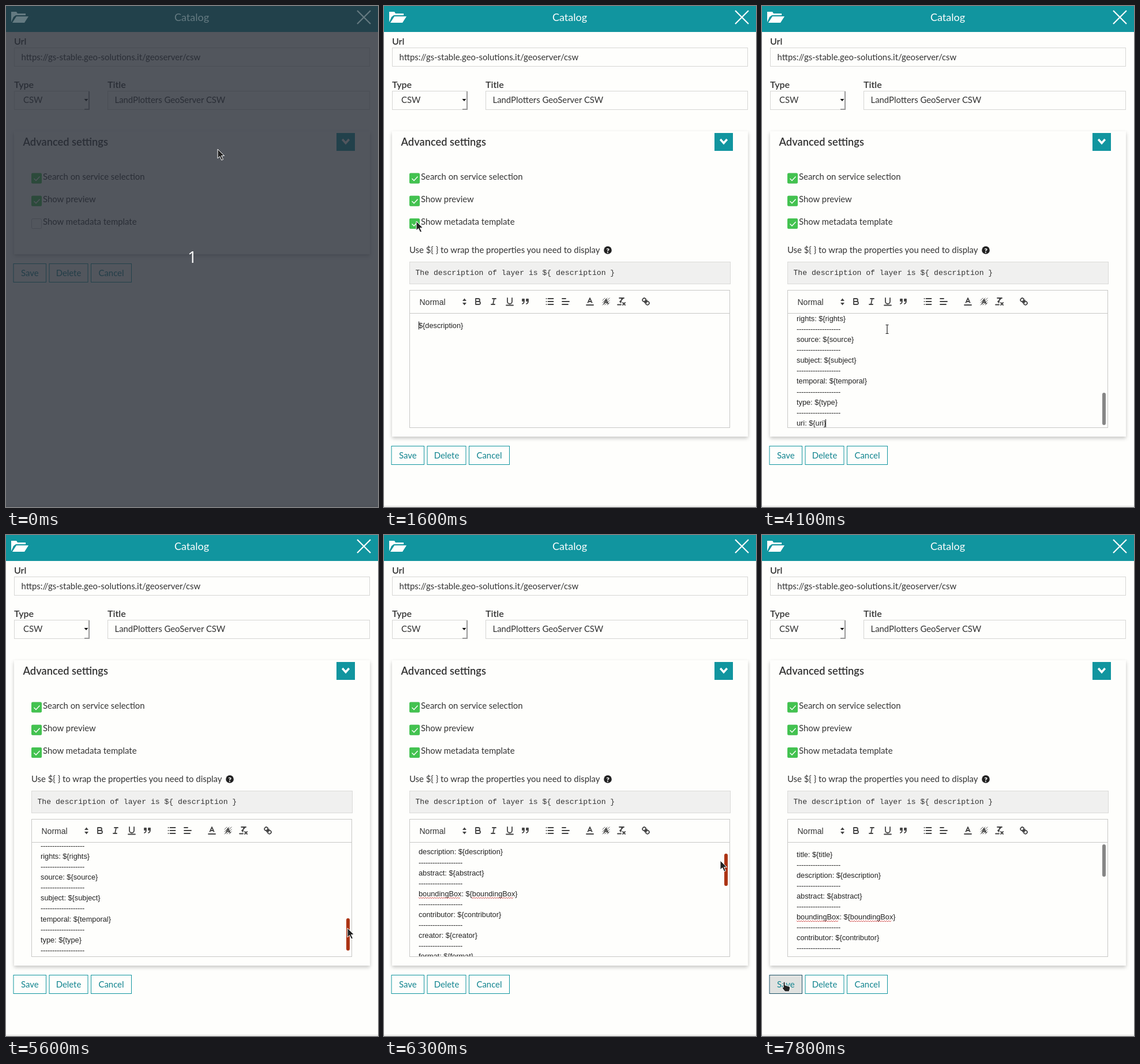
Recreate the animation shown at these times as an HTML page. Size 645x868 px, loop 8 s.

```html
<!DOCTYPE html>
<html lang="en">
<head>
<meta charset="utf-8">
<title>Catalog settings</title>
<style>
  html, body { margin: 0; width: 100%; height: 100%; overflow: hidden; background: #fefefc; }
  svg { display: block; }
  text { font: 14.9px Lato, sans-serif; fill: #333; white-space: pre; }
  .label { font-weight: 600; font-size: 16px; }
  .heading { font-weight: 600; font-size: 18.3px; }
  .field { fill: #fefefc; stroke: #d6d6d4; }
  .box { fill: none; stroke: #c8c8c6; }
  .teal { fill: #11959f; }
  .code { font: 13.1px "Liberation Mono", monospace; }
  .picker { font: 14px "Liberation Sans", sans-serif; }
  #editor text { font: 12.75px "Liberation Sans", sans-serif; fill: #222; }
  #editor .rule { letter-spacing: -.25px; }
  #buttons rect { fill: #fefefc; stroke: #11959f; }
  #buttons text { fill: #11848f; text-anchor: middle; }
  #buttons .pressed { fill: #e0e2e0; stroke: #1c5266; }
  .icons { fill: none; stroke: #444; stroke-width: 2; stroke-linecap: round; stroke-linejoin: round; }
  .pointer { fill: #222; stroke: #fff; stroke-linejoin: round; }
</style>
</head>
<body>
<svg width="645" height="868" viewBox="0 0 645 868">
  <rect width="645" height="868" fill="#fefefc"/>
  <rect y="866" width="645" height="1" fill="#dcdcda"/>
  <rect class="teal" width="645" height="45"/>

  <text class="label" x="14" y="66.5">Url</text>
  <rect class="field" x="14.5" y="72.5" width="616" height="32"/>
  <text x="26.5" y="93.5">https://gs-stable.geo-solutions.it/geoserver/csw</text>
  <text class="label" x="14" y="141.5">Type</text>
  <rect class="field" x="14.5" y="147.5" width="130" height="32"/>
  <path d="M144 148v31h-8" fill="none" stroke="#999" stroke-width="2"/>
  <path d="M135.5 161h7l-3.5 4z" fill="#111"/>
  <text x="30" y="168">CSW</text>
  <text class="label" x="176" y="141.5">Title</text>
  <rect class="field" x="176.5" y="147.5" width="454" height="32"/>
  <text x="188.5" y="168">LandPlotters GeoServer CSW</text>

  <rect id="panel" x="14" y="217" width="617" height="213" fill="#fefefc"
    style="filter:drop-shadow(0 3px 3px rgba(0,0,0,.22))"/>
  <text class="heading" x="29.5" y="241.5">Advanced settings</text>
  <rect class="teal" x="573" y="220" width="32" height="31"/>
  <path d="M583.2 231l5.8 6.5 5.8-6.5" fill="none" stroke="#fff" stroke-width="3.5"/>
  <g id="checks"></g>

  <g id="template">
    <text x="44" y="428">Use \${ } to wrap the properties you need to display</text>
    <circle cx="388" cy="423" r="6.8" fill="#222"/>
    <text x="388" y="427.5" text-anchor="middle" style="font-size:12px;font-weight:900;fill:#fff">?</text>
    <rect x="44.5" y="443.5" width="556" height="38" fill="#f0f0ef" stroke="#dadad8"/>
    <text class="code" x="54.5" y="466">The description of layer is ${ description }</text>
    <rect class="box" x="44.5" y="492.5" width="555" height="40"/>
    <rect class="box" x="44.5" y="532.5" width="555" height="198"/>
    <text class="picker" x="61.5" y="517.5">Normal</text>
    <path d="M136 511l3.5-4.5 3.5 4.5zM136 514l3.5 4.5 3.5-4.5z" fill="#444"/>
    <g class="icons" id="tools"></g>
    <svg id="editor" x="45" y="533" width="554" height="197" viewBox="45 533 554 197">
      <g id="draft">
        <rect id="selection" x="60" y="546" width="77" height="16" fill="#a9cdf3"/>
        <text x="60" y="557.5">${description}</text>
      </g>
      <g id="lines"></g>
      <rect id="caret" width="1" height="14" fill="#111"/>
      <rect id="thumb" x="590" width="6" height="56" rx="3"/>
    </svg>
  </g>

  <g id="buttons">
    <rect id="save" x="13" y="446.5" width="56.5" height="32"/>
    <text x="41.3" y="467.5">Save</text>
    <rect x="75" y="446.5" width="67" height="32"/>
    <text x="108.5" y="467.5">Delete</text>
    <rect x="147.5" y="446.5" width="70" height="32"/>
    <text x="182.5" y="467.5">Cancel</text>
  </g>

  <rect id="shade" width="645" height="868" fill="#272c36" opacity=".8"/>
  <g id="header" fill="#fff">
    <path d="M9 28V10h9l2 3h14v3H17l-4 3zM11 29l7-11h21l-7 11z"/>
    <path d="M609 8l23 23m0-23l-23 23" stroke="#fff" stroke-width="2.2"/>
    <text x="322" y="26" text-anchor="middle" style="font-size:18px;fill:#fff">Catalog</text>
  </g>
  <text id="count" x="323" y="444.5" text-anchor="middle" style="font:28px 'Open Sans',sans-serif;fill:#fff">1</text>

  <g id="cursor">
    <path class="pointer" id="arrow" d="M0 0v16l3.7-3.5 3 6.5 2.8-1.2-3-6.3h5z"/>
    <path id="beam" d="M-2.5-7.5h2l.5.5.5-.5h2M0-7V7M-2.5 7.5h2l.5-.5.5.5h2" fill="none" stroke="#222" stroke-width="1.2"/>
    <path class="pointer" id="hand" d="M0 1q1.5-2 3 0v5l7 2q2 1 1.5 4l-1.5 5H3l-5-6q0-2 2-1z"/>
  </g>
</svg>
<script>
const LOOP = 8000, STEP = 100, LINE = 18.1, SCROLL_RATIO = 2.518;
const $ = id => document.getElementById(id);
const show = (id, on) => $(id).style.display = on ? '' : 'none';
const move = (id, x, y) => $(id).setAttribute('transform', `translate(${x} ${y})`);

$('template').firstElementChild.textContent = 'Use ${ } to wrap the properties you need to display';

$('checks').innerHTML = ['Search on service selection', 'Show preview', 'Show metadata template']
  .map((label, i) => `<g transform="translate(44 ${289.5 + i * 39.3})">
    <rect x=".5" y=".5" width="17" height="17" rx="2" fill="#fefefc" stroke="#c4c4c4"/>
    <g class="tick"><rect width="18" height="18" rx="2" fill="#43c250"/>
    <path d="M4.5 9.5l3.5 3.5 6.5-7" fill="none" stroke="#fff" stroke-width="1.4"/></g>
    <text x="20" y="11">${label}</text></g>`).join('');
const lastTick = document.querySelectorAll('.tick')[2];

// Toolbar icons on an 18px grid, keyed by horizontal centre
const icons = {
  163: 'M5 4h4.5a2.5 2.5 0 0 1 0 5H5zM5 9h5.5a2.5 2.5 0 0 1 0 5H5z',
  190: 'M7 4h6M5 14h6M8 14l2-10',
  218: 'M5 3v6a4 4 0 0 0 8 0V3M3 15.5h12',
  245: 'M4 5h3v3H4zM11 5h3v3h-3zM7 8c0 4-3 5-3 5M14 8c0 4-3 5-3 5M5.5 6v1M12.5 6v1',
  287.5: 'M6 4h9M6 9h9M6 14h9M3 4h0M3 9h0M3 14h0',
  315: 'M3 4h6M3 9h12M3 14h10',
  357: 'M3 15h12M5.5 11L9 3l3.5 8M11.6 9H6.4',
  385: 'M5.5 13L9 5l3.5 8M11.6 10.5H6.4',
  412: 'M5 3h8M6 9.4L12 3M7.5 11l2-8M11 11l4 4M15 11l-4 4M2 14.5h6',
  454: 'M7 11l4-4M8.9 4.6a3.5 3.5 0 0 1-4.3 4.3C3.2 7.5 2 6.4 4.2 4.2S7.5 3.2 8.9 4.6zM13.4 9.1a3.5 3.5 0 0 0-4.3 4.3c1.4 1.4 2.5 2.5 4.7.4s1-3.3-.4-4.7z'
};
const hatch = '<path d="M379 510l4-4M379 514l8-8M379 518l12-12M383 518l8-8M387 518l4-4" stroke-width=".9"/>';
$('tools').innerHTML = hatch + Object.entries(icons).map(([x, d]) =>
  `<path transform="translate(${x - 9} 503)" d="${d}" stroke-width="1.8"/>`).join('');

const names = ['title', 'description', 'abstract', 'boundingBox', 'contributor', 'creator', 'format',
  'identifier', 'references', 'rights', 'source', 'subject', 'temporal', 'type', 'uri'];
const wave = (x, y) => `<path d="M${x} ${y}${'l2 2 2-2'.repeat(18)}" fill="none" stroke="#c33" stroke-width=".9"/>`;
$('lines').innerHTML = names.map((name, i) => {
  const y = 557.5 + 2 * i * LINE;
  return `<text x="60" y="${y}">${name}: \${${name}}</text>` +
    (name === 'boundingBox' ? wave(60, y + 2) + wave(152, y + 2) : '') +
    (i < names.length - 1 ? `<text class="rule" x="60" y="${y + LINE}">${'-'.repeat(19)}</text>` : '');
}).join('');

// Keys: time, then values
const cursorPath = [
  [0, 367, 248], [500, 367, 248], [1000, 55, 376], [1100, 55, 376], [1200, 56, 373], [2000, 56, 373],
  [2200, 101, 409], [2300, 101, 409], [2500, 308, 490], [2600, 262, 550], [2700, 217, 560],
  [4400, 217, 560], [5300, 592, 687], [5500, 592, 687], [5600, 592, 681], [5900, 597, 631],
  [6300, 583, 564], [6400, 581, 555], [6600, 581, 553], [6800, 579, 530], [7200, 579, 530],
  [7400, 20, 784], [7500, 57, 776], [7600, 57, 776], [7700, 42, 775], [7800, 37, 774], [LOOP, 37, 774]
];
const thumbPath = [[0, 670], [5500, 670], [5600, 664], [6300, 552], [6400, 542], [6500, 536], [LOOP, 536]];

function at(keys, t) {
  const i = keys.findIndex(k => k[0] > t), a = keys[i - 1], b = keys[i];
  const p = (t - a[0]) / (b[0] - a[0]);
  return a.slice(1).map((v, j) => v + (b[j + 1] - v) * p);
}

function draw(now) {
  const t = Math.floor(now % LOOP / STEP) * STEP;
  const dim = t < 500, open = t >= 1600, pasted = t >= 4100;
  show('shade', dim);
  show('count', dim);
  $('header').setAttribute('opacity', dim ? .3 : 1);

  show('template', open);
  lastTick.style.display = open ? '' : 'none';
  $('panel').setAttribute('height', open ? 529 : 213);
  move('buttons', 0, open ? 316 : 0);
  $('save').setAttribute('class', t >= 7700 ? 'pressed' : '');

  const [top] = at(thumbPath, t), scroll = (top - 536) * SCROLL_RATIO;
  show('draft', !pasted);
  show('selection', t >= 3200);
  show('lines', pasted);
  show('thumb', pasted);
  move('lines', 0, -scroll);
  $('thumb').setAttribute('y', top);
  $('thumb').setAttribute('fill', t >= 5400 && t < 7100 ? '#ac3414' : '#868686');
  show('caret', t < 2400 || pasted && !(t >= 4700 && t < 5200));
  move('caret', pasted ? 110 : 60, pasted ? 546.5 + 28 * LINE - scroll : 546.5);

  const shape = t >= 7700 ? 'hand' : t >= 2600 && t < 5200 ? 'beam' : 'arrow';
  for (const id of ['arrow', 'beam', 'hand']) show(id, id === shape);
  move('cursor', ...at(cursorPath, t));
}

const start = performance.now();
(function tick() {
  draw(performance.now() - start);
  requestAnimationFrame(tick);
})();
</script>
</body>
</html>
```
